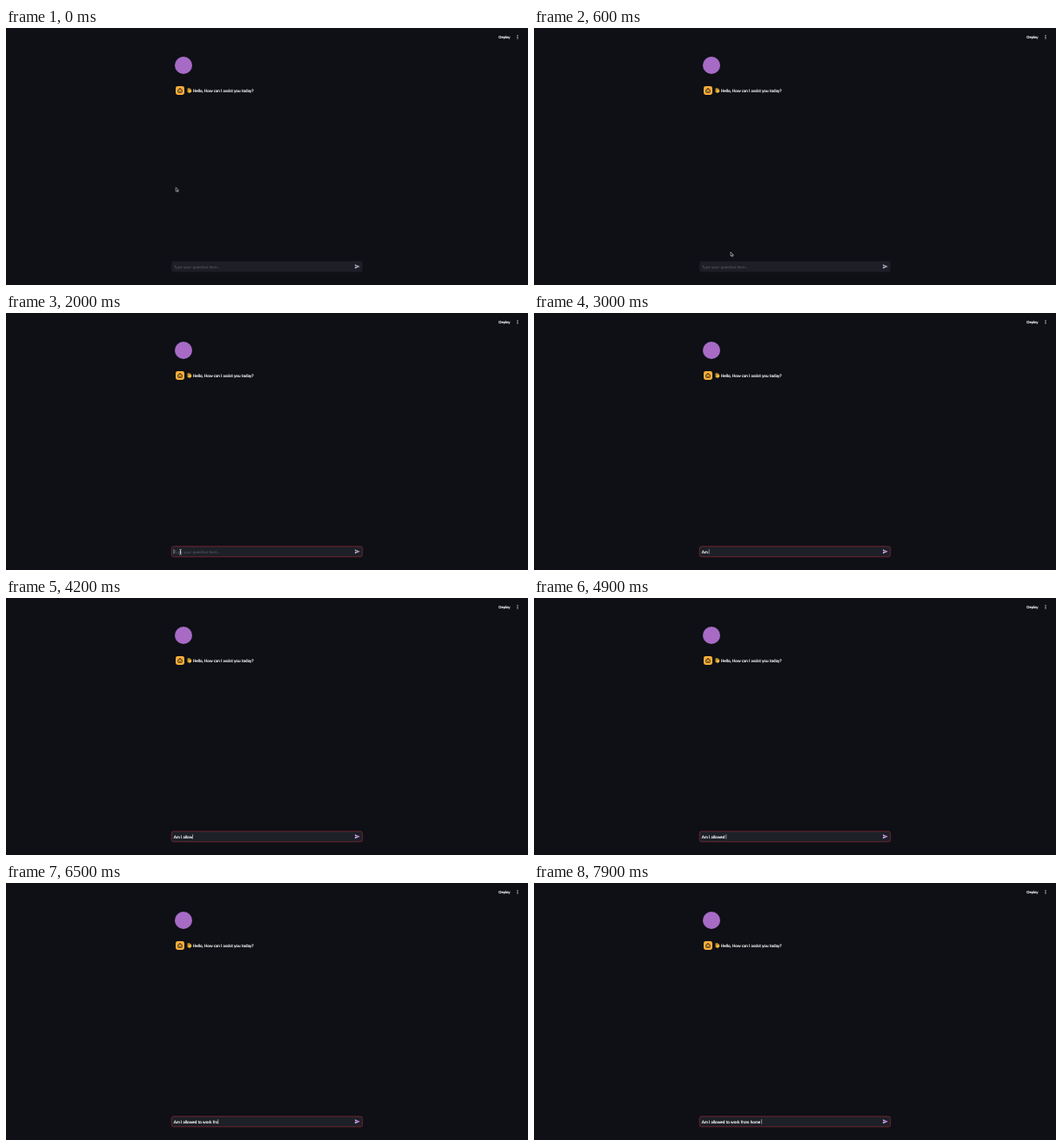
These frames come from a looping animation (600 by 296 pixels, 8000 ms). An HTML page:

```html
<!DOCTYPE html>
<html lang="en">
<head>
<meta charset="utf-8">
<title>Chat assistant</title>
<style>
  html, body { margin: 0; width: 100%; height: 100%; overflow: hidden; background: #0e1015; }
  svg { display: block; width: 100vw; height: 100vh; }
  text { font-family: Lato, "Open Sans", sans-serif; font-size: 4.7px; fill: #fafafa; white-space: pre; }
  .strong { stroke: #fafafa; stroke-width: .18; }
</style>
</head>
<body>
<svg viewBox="0 0 600 296" text-rendering="geometricPrecision">
  <text class="strong" x="566.3" y="11.8" style="font-size:4.2px">Deploy</text>
  <g fill="#f0f0f2">
    <circle cx="588" cy="8.5" r=".6"/><circle cx="588" cy="10.2" r=".6"/><circle cx="588" cy="11.9" r=".6"/>
  </g>

  <circle cx="204" cy="43" r="10" fill="#a76bc6"/>

  <rect x="195" y="67" width="10" height="10" rx="2.4" fill="#ffb03b"/>
  <g fill="none" stroke="#2b2318" stroke-width=".75">
    <path d="M197.9 70.7h4.2v3.7h-4.2zM197.9 72.5h-1M202.1 72.5h1"/>
    <path d="M199 72v.7M201 72v.7M198.9 73.6h2.2" stroke-width=".6"/>
    <circle cx="200" cy="69.8" r=".5"/>
  </g>

  <g transform="rotate(-30 210.8 72)" stroke="#f6bb3c" stroke-linecap="round" stroke-width=".85">
    <path d="M209.3 72.2v-2M210.4 71.6v-2.4M211.5 71.6v-2.2M212.6 72.2v-1.5M209.3 73.4l-1-1"/>
    <ellipse cx="210.9" cy="73" rx="1.5" ry="1.4" fill="#f6bb3c"/>
  </g>
  <text class="strong" x="214.7" y="73.7">Hello, How can I assist you today?</text>

  <rect id="box" x="190.3" y="268.8" width="219.4" height="12" rx="2.4" stroke-width=".6"/>
  <text id="hint" x="193" y="276.6" style="fill:#60616b">Type your question here...</text>
  <text id="typed" class="strong" x="192.8" y="276.6"></text>
  <path id="caret" d="M0 272.2v5.3" stroke="#fafafa" stroke-width=".5"/>
  <path id="send" d="M401 272.2l5.9 2.5-5.9 2.5v-1.9l3-.6-3-.6z"/>
  <path id="sendDot" d="M403.3 274.7h2.2" stroke="#d9456a" stroke-width=".7"/>

  <path id="arrow" d="M0 0v4.6l1.1-1 .8 1.7.8-.4-.8-1.6h1.5z" fill="#08080a" stroke="#f4f4f4" stroke-width=".5"/>
  <path id="beam" d="M-1.3-3q1.3 0 1.3.8v4.4q0 .8-1.3.8M1.3-3q-1.3 0-1.3.8v4.4q0 .8 1.3.8M-.7 0h1.4" fill="none" stroke="#e8e8ea" stroke-width=".6"/>
</svg>
<script>
const LOOP = 8000, FOCUS = 1000, TYPE_START = 2700;
const QUESTION = "Am I allowed to work from home ";
const $ = id => document.getElementById(id);
const clamp = v => Math.max(0, Math.min(1, v));
const set = (id, name, value) => $(id).setAttribute(name, value);
const show = (id, on) => set(id, "visibility", on ? "visible" : "hidden");

// [time, characters typed]
const typing = [[2700, 1], [3000, 3], [4200, 10], [5700, 18], [6500, 24], [7900, 31]];
// [time, x, y] of the pointer
const pointer = [[0, 195.2, 183.6], [200, 198, 190], [600, 226, 258], [800, 227, 273],
  [1000, 203, 274], [1900, 203, 274], [2500, 188.5, 281.5]];

function track(keys, t) {
  const i = keys.findIndex(k => k[0] > t);
  if (i < 0) return keys[keys.length - 1].slice(1);
  if (i === 0) return keys[0].slice(1);
  const a = keys[i - 1], b = keys[i], p = (t - a[0]) / (b[0] - a[0]);
  return a.slice(1).map((v, j) => v + (b[j + 1] - v) * p);
}

function render(t) {
  const focused = t >= FOCUS, active = t >= TYPE_START;
  const glow = focused ? .8 * clamp(.5 + (t - FOCUS) / 500) : 0;
  set("box", "fill", focused ? "#1d2027" : "#1e1e27");
  set("box", "stroke", focused ? `rgba(204,49,66,${glow})` : "#1e1e27");

  const count = active ? Math.floor(track(typing, t)[0] + 1e-6) : 0;
  $("typed").textContent = QUESTION.slice(0, count);
  show("hint", !active);
  set("caret", "transform", `translate(${193 + (count ? $("typed").getComputedTextLength() : 0)})`);
  show("caret", focused && (active || (t - FOCUS) % 1000 < 500));
  set("send", "fill", active ? "#c9a5ee" : "#aaa8b8");
  show("sendDot", active);

  const [x, y] = track(pointer, t);
  const inside = x > 190 && y > 268 && y < 281;
  set("arrow", "transform", `translate(${x} ${y})`);
  set("beam", "transform", `translate(${x} ${y})`);
  show("arrow", !inside && !active);
  show("beam", inside && !active);
}

const start = performance.now();
function tick() {
  render((performance.now() - start) % LOOP);
  requestAnimationFrame(tick);
}
tick();
</script>
</body>
</html>
```
